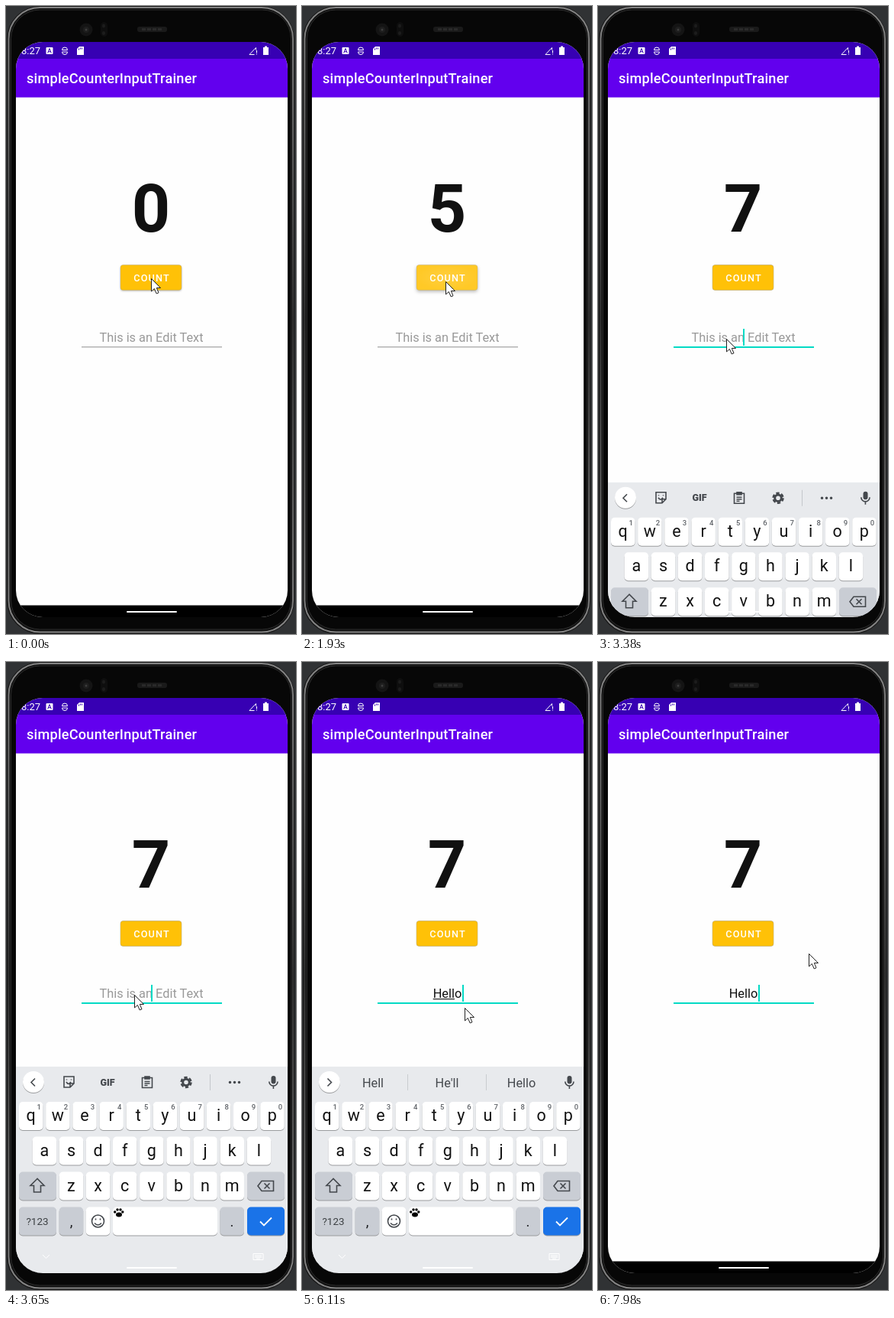
These frames come from a looping animation (380 px wide and 821 px high, 8000 ms). An HTML page:

```html
<!DOCTYPE html>
<html lang="en">
<head>
<meta charset="utf-8">
<title>Counter app</title>
<style>
  html, body { margin: 0; width: 100%; height: 100%; overflow: hidden; background: #303234; }
  svg { display: block; font-family: Roboto, sans-serif; }
  .mid { text-anchor: middle; }
  .line { fill: none; stroke: #44484d; stroke-width: 1.6; }
  .key { filter: drop-shadow(0 1px .4px #0005); }
</style>
</head>
<body>
<svg width="380" height="821" viewBox="0 0 380 821">
  <defs>
    <clipPath id="screen"><rect x="13" y="47" width="356" height="752" rx="35"/></clipPath>
    <radialGradient id="glow">
      <stop stop-color="#fff" stop-opacity=".36"/>
      <stop offset="1" stop-color="#fff" stop-opacity=".2"/>
    </radialGradient>
    <linearGradient id="rim" x2="0" y2="1">
      <stop stop-color="#858585"/><stop offset=".3" stop-color="#555"/>
      <stop offset=".5" stop-color="#333"/><stop offset="1" stop-color="#858585"/>
    </linearGradient>
  </defs>

  <!-- phone body -->
  <rect x="1.5" y=".5" width="376" height="820" rx="43" fill="#111" stroke="#1a1a1a"/>
  <rect x="3.500" y="2" width="372.500" height="816.500" rx="41" fill="none" stroke="url(#rim)" stroke-width="2"/>
  <rect x="6.500" y="5" width="367" height="810" rx="38" fill="#070707" stroke="#2c2c2c"/>
  <circle cx="105" cy="31" r="8.500" fill="#141414"/>
  <circle cx="105" cy="31" r="4" fill="#1e1e1e"/>
  <circle cx="105" cy="31" r="1.500" fill="#3c3c3c"/>
  <rect x="124" y="21" width="9" height="19" rx="4.500" fill="#0e0e0e"/>
  <path d="M128 25.500v1M128 35v1" stroke="#1c1c1c" stroke-width="4" stroke-linecap="round"/>
  <rect x="172" y="27" width="39" height="7" rx="3" fill="#1a1a1a"/>
  <path d="M178 30.500h27" stroke="#2a2a2a" stroke-width="3" stroke-dasharray="5 2"/>

  <g clip-path="url(#screen)">
    <rect x="13" y="47" width="356" height="752" fill="#fefefe"/>
    <rect x="13" y="47" width="356" height="22" fill="#3700b3"/>
    <rect x="13" y="69" width="356" height="50.500" fill="#6200ee"/>
    <rect x="13" y="783.500" width="356" height="16"/>
    <g fill="#fff">
      <text x="20" y="63" font-size="13">8:27</text>
      <rect x="52.500" y="54" width="9" height="9" rx="1"/>
      <path d="M54.700 61.500l2.300-6 2.300 6M55.500 59.700h3" fill="none" stroke="#3700b3"/>
      <path d="M73.500 57.500a3.500 3.500 0 0 1 7 0zM73.500 60h7a3.500 3.500 0 0 1-7 0z" fill="none" stroke="#fff"/>
      <path d="M96 53h6v11h-9v-8z"/>
      <path d="M95.500 55.500v2M97.500 54.500v2M99.500 54.500v2" stroke="#3700b3"/>
      <path d="M327.500 57.500v-3l-8.500 9h6.500" fill="none" stroke="#fff"/>
      <path d="M328.500 58v3.500M328.500 62.500v1" stroke="#fff"/>
      <path d="M337 54h2v-1.500h3V54h2v10h-7z"/>
      <text x="27" y="101" font-size="18.200" font-weight="500" letter-spacing=".2">simpleCounterInputTrainer</text>
    </g>

    <text id="count" class="mid" x="190" y="295" font-size="88" font-weight="700" fill="#111">0</text>
    <g id="button">
      <rect x="150" y="338.500" width="80" height="33" rx="3.500" fill="#ffc107" stroke="#8885" stroke-width=".8"/>
      <rect id="ripple" x="150" y="338.500" width="80" height="33" rx="3.500" fill="url(#glow)"/>
      <rect id="held" x="150" y="338.500" width="80" height="33" rx="3.500" fill="#fff" opacity=".24"/>
    </g>
    <text class="mid" x="191" y="360" font-size="12.700" font-weight="500" letter-spacing="1.140" fill="#fff">COUNT</text>

    <text id="hint" class="mid" x="190.500" y="439" font-size="16.350" fill="#999">This is an Edit Text</text>
    <text id="input" class="mid" x="190.500" y="439" font-size="16.350" fill="#111"></text>
    <rect id="compose" y="440" height="1.200" fill="#222"/>
    <rect id="field" x="99" y="445" width="184"/>
    <rect id="caret" y="422" width="2" height="22" fill="#03dac5"/>

    <g id="keyboard">
      <rect x="13" y="529" width="356" height="270" fill="#e8eaed"/>
      <circle class="key" cx="36" cy="549" r="14" fill="#fff"/>
      <path id="chevron" class="line"/>
      <rect x="347.500" y="541" width="6" height="10.500" rx="3" fill="#44484d"/>
      <path class="line" d="M344.800 548.500a5.600 5.600 0 0 0 11.200 0M350.400 554v4"/>
      <g id="tools">
        <path class="line" d="M76 542h13v9l-5 5h-8zM89 551h-5v5M79 549q3 5 6 0M79.500 545.500v1M85.500 545.500v1"/>
        <text class="mid" x="133" y="553.500" font-size="12.500" font-weight="900" fill="#44484d">GIF</text>
        <path class="line" d="M178.500 543.500h13v13h-13zM182 542h6v3h-6zM181.500 548.500h7M181.500 551h7M181.500 553.500h4"/>
        <circle class="line" cx="236" cy="549.500" r="6.500" style="stroke-width:2.500;stroke-dasharray:4.300 2.500"/>
        <circle class="line" cx="236" cy="549.500" r="4.300" style="stroke-width:3"/>
        <path d="M267.500 539v21" stroke="#c4c7cb"/>
        <path d="M293.500 549.500h.01M299.500 549.500h.01M305.500 549.500h.01" stroke="#44484d" stroke-width="3.600" stroke-linecap="round"/>
      </g>
      <g id="words" class="mid" font-size="16.300" fill="#44484d">
        <text x="93" y="556">Hell</text><text x="190" y="556">He'll</text><text x="287.500" y="556">Hello</text>
        <path d="M138.500 539v21M241.500 539v21" stroke="#c9ccd0"/>
      </g>
      <g id="caps"></g>
      <path id="shift" class="line" d="M41 675.500l-9 9h4.500v8.500h9v-8.500h4.500z"/>
      <path class="line" d="M335 678.500h15.500v13H335l-5-6.500zM338.500 681.500l7 7M345.500 681.500l-7 7"/>
      <text class="mid" x="41" y="736" font-size="13.500" fill="#3c4043">?123</text>
      <g class="mid" font-size="19" fill="#202124"><text x="85.500" y="738">,</text><text x="296" y="738">.</text></g>
      <circle class="line" cx="120.500" cy="731" r="8"/>
      <path class="line" d="M116 733.500q4.500 5 9 0M117.500 727.500v2M123.500 727.500v2"/>
      <g>
        <ellipse cx="148" cy="722.500" rx="4" ry="3"/>
        <circle cx="142.700" cy="719" r="1.700"/><circle cx="146" cy="716" r="1.700"/>
        <circle cx="150" cy="716" r="1.700"/><circle cx="152.800" cy="719" r="1.700"/>
      </g>
      <path d="M333 731.500l5 5 10-10" fill="none" stroke="#fff" stroke-width="1.800"/>
      <path d="M48 775l4.500 4.500 4.500-4.500M324 773.500h13v8h-13zM326 776h9M326 778h9M328 780h5" fill="none" stroke="#fff"/>
    </g>
    <rect x="158" y="791" width="66" height="2" rx="1" fill="#fff"/>
  </g>
  <path id="pointer" d="M0 0V16.500L3.900 13 6.700 19.500 9.500 18.300 6.800 12H12z" fill="#fff" stroke="#222"/>
</svg>
<script>
const $ = id => document.getElementById(id);
const set = (id, attrs) => { for (const k in attrs) $(id).setAttribute(k, attrs[k]); };
const show = (id, on) => { $(id).style.display = on ? '' : 'none'; };
const within = (t, a, b) => t >= a && t < b;
const ease = p => { p = Math.min(1, Math.max(0, p)); return p * p * (3 - 2 * p); };

const LOOP = 8000, PITCH = 35.13;
const CLICKS = [130, 640, 1010, 1300, 1690, 1950, 2190];
const TYPED = [5430, 5570, 5700, 5840, 6110];
const CARET_OFF = [[0, 2970], [3800, 4350], [4930, 5300], [6660, 7200], [7580, 7700]];
// pointer positions: time, x, y
const POINTER = [
  [0, 190, 356], [250, 188, 360], [2300, 183, 390], [2440, 166, 475], [2560, 164, 464],
  [2690, 166, 448], [2840, 168, 435], [3950, 190, 446], [4070, 213, 452], [6390, 230, 480],
  [6530, 262, 560], [6660, 300, 640], [6800, 340, 720], [6930, 368, 786], [7060, 350, 765],
  [7200, 338, 748], [7330, 331, 738], [7710, 315, 610], [7850, 285, 440], [7980, 276, 381]
];

const key = (x, y, w, fill) =>
  `<rect class="key" x="${x}" y="${y}" width="${w}" height="37" rx="5" fill="${fill}"/>`;

function buildKeys() {
  let keys = '', letters = '';
  [['qwertyuiop', 17, 575], ['asdfghjkl', 34.6, 620.5], ['zxcvbnm', 69.7, 666.5]].forEach(([row, left, y], r) => {
    [...row].forEach((c, i) => {
      const x = left + i * PITCH;
      keys += key(x, y, 31.5, '#fff');
      letters += `<text x="${x + 15.7}" y="${y + 25}">${c}</text>`;
      if (!r) keys += `<text class="mid" x="${x + 26.3}" y="585" font-size="9.5" font-weight="500" fill="#5f6368">${(i + 1) % 10}</text>`;
    });
  });
  const grey = '#c9cdd4';
  keys += key(17, 666.5, 49, grey) + key(316, 666.5, 49, grey) + key(17, 712.5, 49, grey)
    + key(69.7, 712.5, 31.5, grey) + key(104.8, 712.5, 31.5, '#fff') + key(140, 712.5, 137, '#fff')
    + key(280.5, 712.5, 31.5, grey) + key(316, 712.5, 49, '#1a73e8');
  $('caps').innerHTML = keys + `<g id="letters" class="mid" font-size="21.5" fill="#111">${letters}</g>`;
}

function drawButton(t) {
  const clicks = CLICKS.filter(c => c <= t);
  const age = t - clicks.at(-1);
  $('count').textContent = clicks.length;
  const held = within(t, 2300, 2970);
  show('held', held);
  set('ripple', { opacity: held || !(age < 400) ? 0 : 1 - ease((age - 130) / 270) });
  const shadow = t >= 2560 ? '0 .3px .5px #0004' : age < 260 ? '0 2.5px 2px #0004' : '0 1.5px 1.2px #0004';
  $('button').style.filter = `drop-shadow(${shadow})`;
}

function drawField(t) {
  const word = 'Hello'.slice(0, TYPED.filter(k => k <= t).length);
  const focused = t >= 2970;
  const input = $('input');
  input.textContent = word;
  show('hint', !word);
  const width = word ? input.getComputedTextLength() : 0;
  const marked = t >= 7700 ? 0 : t < 6390 ? Math.min(4, word.length) : 5;
  set('compose', { x: 190.5 - width / 2, width: marked ? input.getSubStringLength(0, marked) : 0 });
  set('field', { height: focused ? 2 : 1.5, fill: focused ? '#03dac5' : '#b3b3b3' });
  set('caret', { x: word ? Math.round(191 + width / 2) : 190 });
  show('caret', !CARET_OFF.some(([a, b]) => within(t, a, b)));
}

function drawKeyboard(t) {
  const shown = ease((t - 3200) / 300) - ease((t - 7650) / 300);
  const caps = within(t, 5300, 5430), typing = t >= 5430;
  show('keyboard', shown > 0);
  set('keyboard', { transform: `translate(0 ${270 * (1 - shown)})` });
  $('letters').style.textTransform = caps ? 'uppercase' : 'none';
  $('shift').style.fill = caps ? '#44484d' : 'none';
  set('chevron', { d: typing ? 'M33.500 544.500l5 5-5 5' : 'M38 544.500l-5 5 5 5' });
  show('tools', !typing);
  show('words', within(t, 5840, 6390));
}

function draw(t) {
  drawButton(t);
  drawField(t);
  drawKeyboard(t);
  const [, x, y] = POINTER.findLast(p => p[0] <= t);
  set('pointer', { transform: `translate(${x + .5} ${y + .5})` });
  show('pointer', !within(t, 4620, 6110));
}

buildKeys();
const start = performance.now();
(function tick() {
  draw((performance.now() - start) % LOOP);
  requestAnimationFrame(tick);
})();
</script>
</body>
</html>
```
